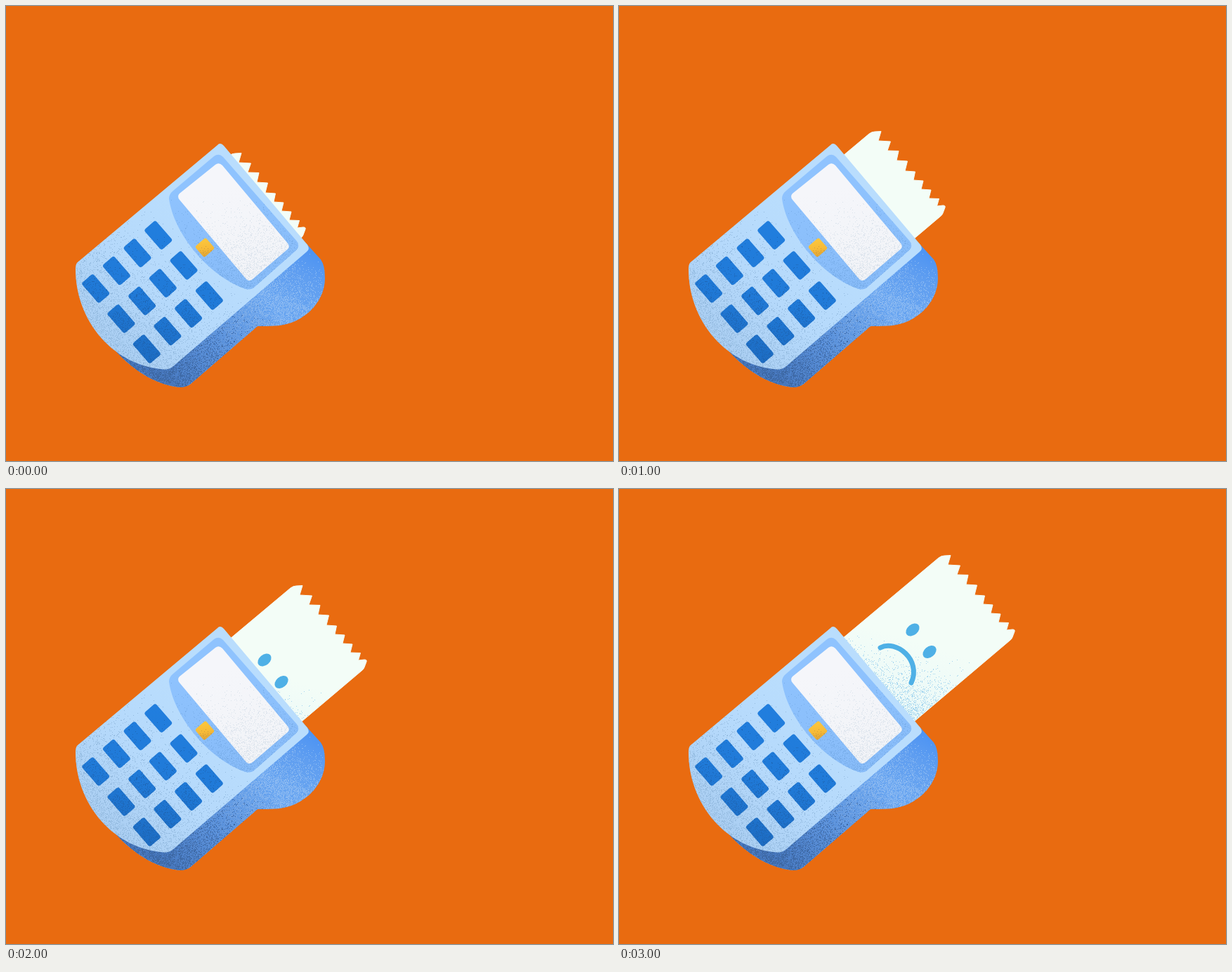
Write an HTML page with a canvas that moves like this. It is 864x648 px and loops after 3.5 s.

```html
<!DOCTYPE html>
<html lang="en">
<head>
<meta charset="utf-8">
<title>Sad receipt</title>
<style>
  html, body { margin: 0; width: 100%; height: 100%; overflow: hidden; background: #e96b10; }
  #stage { position: relative; width: 864px; height: 648px; overflow: hidden; contain: strict; }
  canvas { position: absolute; left: 0; top: 0; }
  #paper { animation: print 3500ms step-end infinite; }
  @keyframes print {
    0%       { transform: translate(-137px, 115px); }
    14.2857% { transform: translate(-121px, 102px); }
    28.5714% { transform: translate(-99px, 84px); }
    42.8571% { transform: translate(-76px, 64px); }
    57.1429% { transform: translate(-50px, 43px); }
    71.4286% { transform: translate(-22px, 19px); }
    85.7143%, 100% { transform: none; }
  }
</style>
</head>
<body>
<div id="stage">
  <canvas id="paper" width="864" height="648"></canvas>
  <canvas id="device" width="864" height="648"></canvas>
</div>
<script>
  const layer = id => document.getElementById(id).getContext('2d');
  const paper = layer('paper'), device = layer('device');

  let seed = 7;
  const random = () => (seed = (seed * 16807) % 2147483647) / 2147483647;

  // Fills a path with a gradient along an axis, then adds grain that thickens towards its end.
  function paint(ctx, path, { axis: [ax, ay, bx, by], fill, grain, density }) {
    const gradient = ctx.createLinearGradient(ax, ay, bx, by);
    fill.forEach((color, i) => gradient.addColorStop(i / (fill.length - 1), color));
    ctx.fillStyle = gradient;
    ctx.fill(path);

    const dx = bx - ax, dy = by - ay, len2 = dx * dx + dy * dy;
    ctx.save();
    ctx.clip(path);
    ctx.fillStyle = grain;
    for (let y = 180; y < 548; y++) {
      for (let x = 94; x < 570; x++) {
        const t = Math.min(1, Math.max(0, ((x - ax) * dx + (y - ay) * dy) / len2));
        if (random() < t * t * density) ctx.fillRect(x, y, 1, 1);
      }
    }
    ctx.restore();
  }

  // A group of equal rounded boxes, turned with the device.
  function boxes(centers, w, h, r) {
    const group = new Path2D(), box = new Path2D();
    box.roundRect(-w / 2, -h / 2, w, h, r);
    for (const [x, y] of centers) group.addPath(box, new DOMMatrix().translate(x, y).rotate(49));
    return group;
  }

  function drawPaper() {
    const sheet = new Path2D(`M306 223 L455 98 Q459 95 463 95
      L472 94.5 468 108 485.5 109 481 122 497 122.5 494 136 509.5 137 506 151
      520.5 152 518 164 532 165 529 177 543 178 540 190 554.5 190.5 551.5 201
      L560 200 Q564 200 563 203 L560 211 Q559 214 556 216 L406 343Z`);
    paint(paper, sheet, {
      axis: [435, 222, 400, 335], fill: ['#f3fdf7', '#e8f7f8'], grain: '#a3d5ee', density: 0.5
    });
    paper.lineWidth = 1;
    paper.lineJoin = 'round';
    paper.strokeStyle = '#f3fdf7';
    paper.stroke(sheet);

    paper.fillStyle = paper.strokeStyle = '#4fb0e6';
    for (const [x, y] of [[418, 200.5], [442, 232]]) {
      paper.beginPath();
      paper.ellipse(x, y, 10.8, 7.6, -40 * Math.PI / 180, 0, Math.PI * 2);
      paper.fill();
    }
    paper.lineWidth = 7;
    paper.lineCap = 'round';
    paper.stroke(new Path2D('M372 226 C394 214 431 243 416 276'));
  }

  function drawDevice() {
    const body = new Path2D(`M420 330 L448 361 Q454 369 454 388 C454 423 421 455.5 380 455.5
      Q369 456 358 456 L263 538 Q257 543 247 543 C212 539 178 518 148 482Z`);
    paint(device, body, {
      axis: [445, 350, 400, 425], fill: ['#4c93f3', '#619ff0', '#67a4f0'],
      grain: '#8ab9f2', density: 0.5
    });
    paint(device, body, {
      axis: [370, 420, 235, 535], fill: ['#4a7fc800', '#4a80cc99', '#4a7cc4'],
      grain: '#3d68a4', density: 0.5
    });

    const face = new Path2D(`M300.5 198.5 Q305 193.5 310 199 L429 340 Q433 346 428 350
      L238 513 Q232 518 225 517.5 C152 512 99 448 99 375 Q98.5 367 103 364Z`);
    paint(device, face, {
      axis: [290, 330, 140, 485], fill: ['#b9ddfd', '#b5d9fb', '#a9cdf1'],
      grain: '#93badf', density: 0.3
    });

    const panel = new Path2D(`M296 214 Q303 209 309 215 L414 335 Q419 342 413 348
      L354 400 Q349 405 341 403 C285 383 238 321 232 274 Q232 268 238 263Z`);
    paint(device, panel, {
      axis: [290, 250, 320, 410], fill: ['#8fc3fe', '#87bbf8'], grain: '#79aeea', density: 0.3
    });

    const screen = new Path2D(`M298 226 Q303 222 308 227 L401 338 Q405 343 400 347
      L351 389 Q346 393 342 389 L247 276 Q243 271 247 267Z`);
    paint(device, screen, {
      axis: [310, 260, 335, 400], fill: ['#f5f6fa', '#f1f3f7'], grain: '#dbe3ec', density: 0.4
    });

    const keys = [];
    for (let col = 0; col < 3; col++) {
      for (let row = 0; row < 4; row++) {
        keys.push([216.8 + 36.3 * col - 29.7 * row, 326.5 + 43 * col + 25.3 * row]);
      }
    }
    paint(device, boxes(keys, 38, 21.8, 3.5), {
      axis: [230, 310, 190, 505], fill: ['#217ede', '#207ad8', '#1d6dc4'],
      grain: '#1d66b6', density: 0.35
    });

    paint(device, boxes([[283, 344]], 20.2, 20.2, 3), {
      axis: [281, 334, 285, 357], fill: ['#fcc53c', '#f7bb38', '#e0a435'],
      grain: '#d09a3c', density: 0.3
    });
  }

  drawPaper();
  drawDevice();
</script>
</body>
</html>
```
